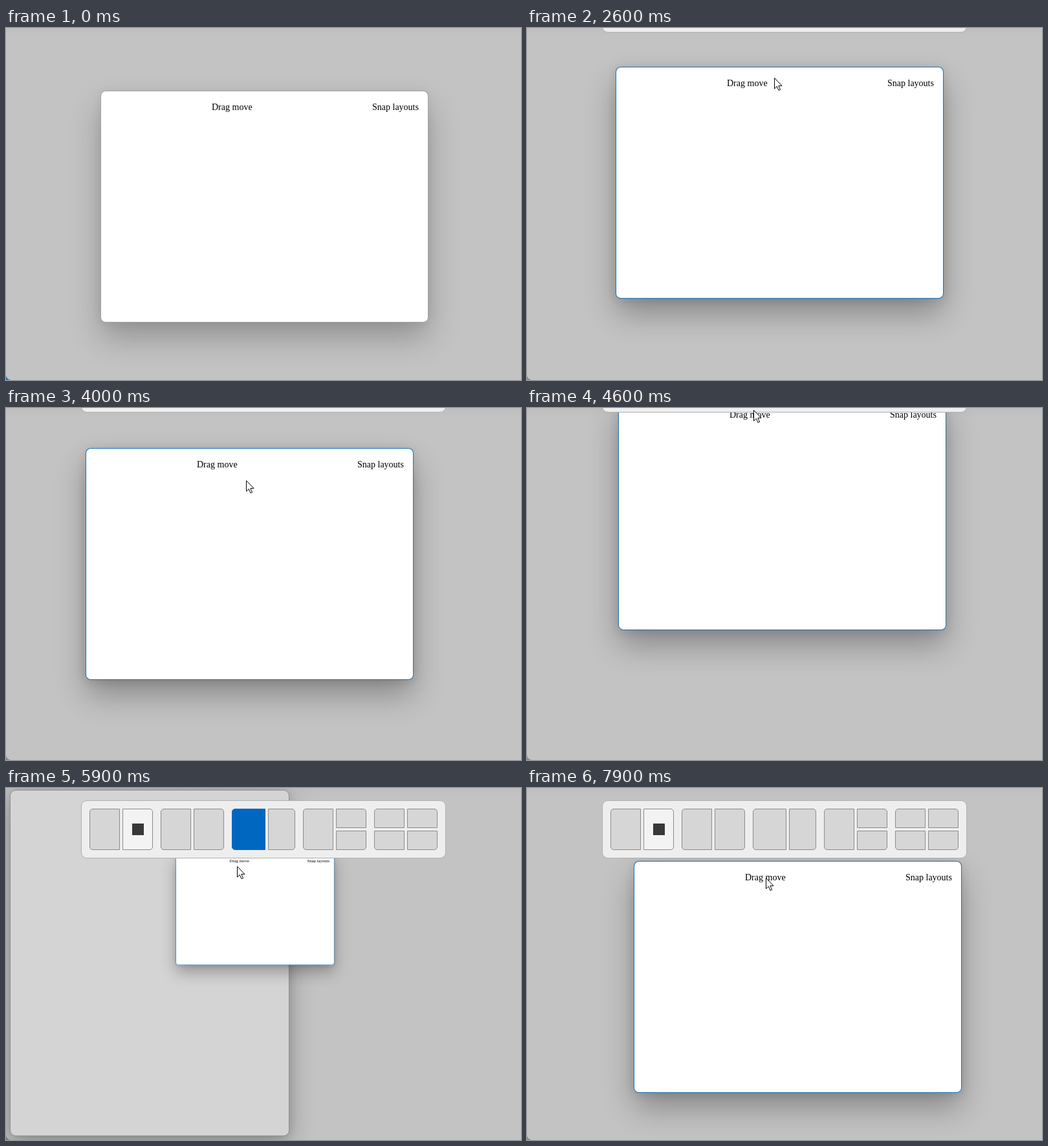
An HTML page that plays this animation: 796x545 px, repeating every 8 s.

```html
<!DOCTYPE html>
<html lang="en">
<head>
<meta charset="utf-8">
<title>Drag move and snap layouts</title>
<style>
html, body { margin: 0; width: 100%; height: 100%; overflow: hidden; }
#stage { position: absolute; inset: 0; overflow: hidden; }
#stage div, #stage svg, #stage span { position: absolute; box-sizing: border-box; }
#desk { inset: 0; background: linear-gradient(#bebebe, #c3c3c3 14px); border-bottom-left-radius: 8px; }
.preview {
  top: 3px; height: 536px; border-radius: 9px;
  background: #d4d4d4; border: 1px solid #919191;
  box-shadow: 0 12px 40px rgba(0, 0, 0, .27), 0 2px 14px rgba(0, 0, 0, .12);
}
#window {
  left: 0; top: 0; width: 505px; height: 357px; border-radius: 7px;
  background: #fff; transform-origin: 0 0;
  font: 14px/16px "Liberation Serif", "Times New Roman", serif; white-space: nowrap;
}
#window span { top: 17px; }
#flyout {
  left: 116px; width: 564px; height: 90px; border-radius: 9px; z-index: 2;
  background: #eee; border: 1px solid #b0b0b0;
}
.zone { border: 1px solid #8b8b8b; background: #d6d6d6; }
.zone.current { background: #f3f3f3; }
.zone.hover { background: #0067c0; border-color: #0067c0; }
#icon { left: 78px; top: 35px; width: 18px; height: 18px; background: #383838; }
#cursor { z-index: 4; left: 0; top: 0; overflow: visible; }
</style>
</head>
<body>
<div id="stage">
  <div id="desk"></div>
  <div class="preview" id="left" style="left:6px;width:432px"></div>
  <div class="preview" id="right" style="left:442px;width:348px"></div>
  <div id="window">
    <span style="left:171px">Drag move</span>
    <span style="left:419px">Snap layouts</span>
  </div>
  <div id="flyout"><div id="icon" style="z-index:1"></div></div>
  <svg id="cursor" width="13" height="21">
    <path d="M.5 .5V17L4.3 13.4 7 19.6 9.5 18.5 6.9 12.4H12Z" fill="#fff" stroke="#000"/>
  </svg>
</div>
<script>
const LOOP = 8000, STEP = 100;
const GRAB_TIME = 2200, OPEN_TIME = 4700;
const SMALL = 0.483;
const GRAB = { x: 203, y: 25 };
const $ = id => document.getElementById(id);

const lerp = (a, b, k) => a + (b - a) * k;
const ramp = (time, from, to) => Math.min(1, Math.max(0, (time - from) / (to - from)));
const ease = k => k * k * (3 - 2 * k);
const cycles = n => n * 2 * Math.PI;
const mix = (a, b, k) => `color-mix(in srgb, ${b} ${k * 100}%, ${a})`;

// Stops of the pointer: time, x, y
const stops = [
  [100, 737, 191], [600, 451, 249], [1400, 451, 249], [2000, 350, 123], [GRAB_TIME, 350, 123],
  [4600, 350, 3], [5200, 395, 55], [6000, 355, 124], [7000, 417, 66], [7300, 369, 139]
];

// Eased travel between stops, with a loose swing while the window is dragged about
function pointer(time) {
  const next = stops.findIndex(stop => stop[0] > time);
  const to = stops.at(next), from = next > 0 ? stops[next - 1] : to;
  const k = ease(ramp(time, from[0], to[0] + (from === to)));
  const swing = ease(ramp(time, GRAB_TIME, 2400)) * (1 - ease(ramp(time, 4050, 4600)));
  const swingX = 345 + 52 * Math.sin(cycles((time - 2509) / 716));
  const swingY = 102 - 25 * Math.cos(cycles((time - 2585) / 611));
  return {
    x: lerp(lerp(from[1], to[1], k), swingX, swing),
    y: lerp(lerp(from[2], to[2], k), swingY, swing)
  };
}

// The dragged window and the hovered zone trail the pointer by one step
const trail = time => pointer(Math.max(time, GRAB_TIME) - STEP);

function hoveredSide(time) {
  const { x, y } = trail(time);
  if (time <= OPEN_TIME + STEP || y > 116) return "";
  return x < 405 ? "left" : "right";
}

// Mean of a condition over two successive steps gives a short fade
const fade = (time, test) => [time, time - STEP].filter(t => test(hoveredSide(t))).length / 2;

// Each snap group has two columns, either of which may be split in two
const GROUP = { width: 98, height: 64, gap: 4 };
function buildGroup(index, width, splitLeft, splitRight) {
  const addZone = (x, y, w, h) => {
    const zone = document.createElement("div");
    const atLeft = x === 0, atTop = y === 0, atBottom = y + h === GROUP.height;
    const corners = [atLeft && atTop, !atLeft && atTop, !atLeft && atBottom, atLeft && atBottom];
    zone.className = "zone";
    Object.assign(zone.style, {
      left: 12 + index * 110 + x + "px", top: 12 + y + "px", width: w + "px", height: h + "px",
      borderRadius: corners.map(round => round ? "5px" : "0").join(" ")
    });
    $("flyout").append(zone);
    return zone;
  };
  const addColumn = (x, w, split) => {
    const rows = split ? 2 : 1;
    const h = (GROUP.height - GROUP.gap * (rows - 1)) / rows;
    return Array.from({ length: rows }, (_, row) => addZone(x, row * (h + GROUP.gap), w, h));
  };
  const second = width + GROUP.gap;
  return [...addColumn(0, width, splitLeft), ...addColumn(second, GROUP.width - second, splitRight)];
}
buildGroup(0, 47)[1].classList.add("current");
buildGroup(1, 47);
const [leftZone, rightZone] = buildGroup(2, 52);
buildGroup(3, 47, false, true);
buildGroup(4, 47, true, true);

function render(time) {
  const tip = pointer(time), held = trail(time);
  const size = lerp(1, SMALL, fade(time, Boolean));
  const active = ramp(time, 800, 1100);

  $("cursor").style.display = time < STEP ? "none" : "block";
  $("cursor").style.transform = `translate(${Math.round(tip.x)}px, ${Math.round(tip.y)}px)`;

  const left = Math.round(held.x - GRAB.x * size);
  const top = Math.round(held.y - GRAB.y * size);
  Object.assign($("window").style, {
    transform: `translate(${left}px, ${top}px) scale(${size})`,
    zIndex: size < 1 && tip.y < 108 ? 3 : 1,
    boxShadow: `0 0 0 1px ${mix("#a0a0a0", "#1c72b6", active)},
      0 24px 48px rgba(0, 0, 0, ${lerp(0.25, 0.3, active)}),
      0 2px 16px rgba(0, 0, 0, ${lerp(0.06, 0.14, active)})`
  });

  const peek = lerp(-91, -83, ramp(time, 2300, 2500));
  $("flyout").style.top = lerp(peek, 19, ramp(time, OPEN_TIME, OPEN_TIME + 200)) + "px";
  $("stage").style.background = mix("#0a78c8", "#858585", active);

  const side = hoveredSide(time);
  leftZone.classList.toggle("hover", side === "left");
  rightZone.classList.toggle("hover", side === "right");
  for (const name of ["left", "right"]) {
    $(name).style.opacity = fade(time - STEP, hovered => hovered === name);
  }
}

const start = performance.now();
function tick() {
  const time = (performance.now() - start) % LOOP;
  render(Math.floor(time / STEP) * STEP);
  requestAnimationFrame(tick);
}
tick();
</script>
</body>
</html>
```
